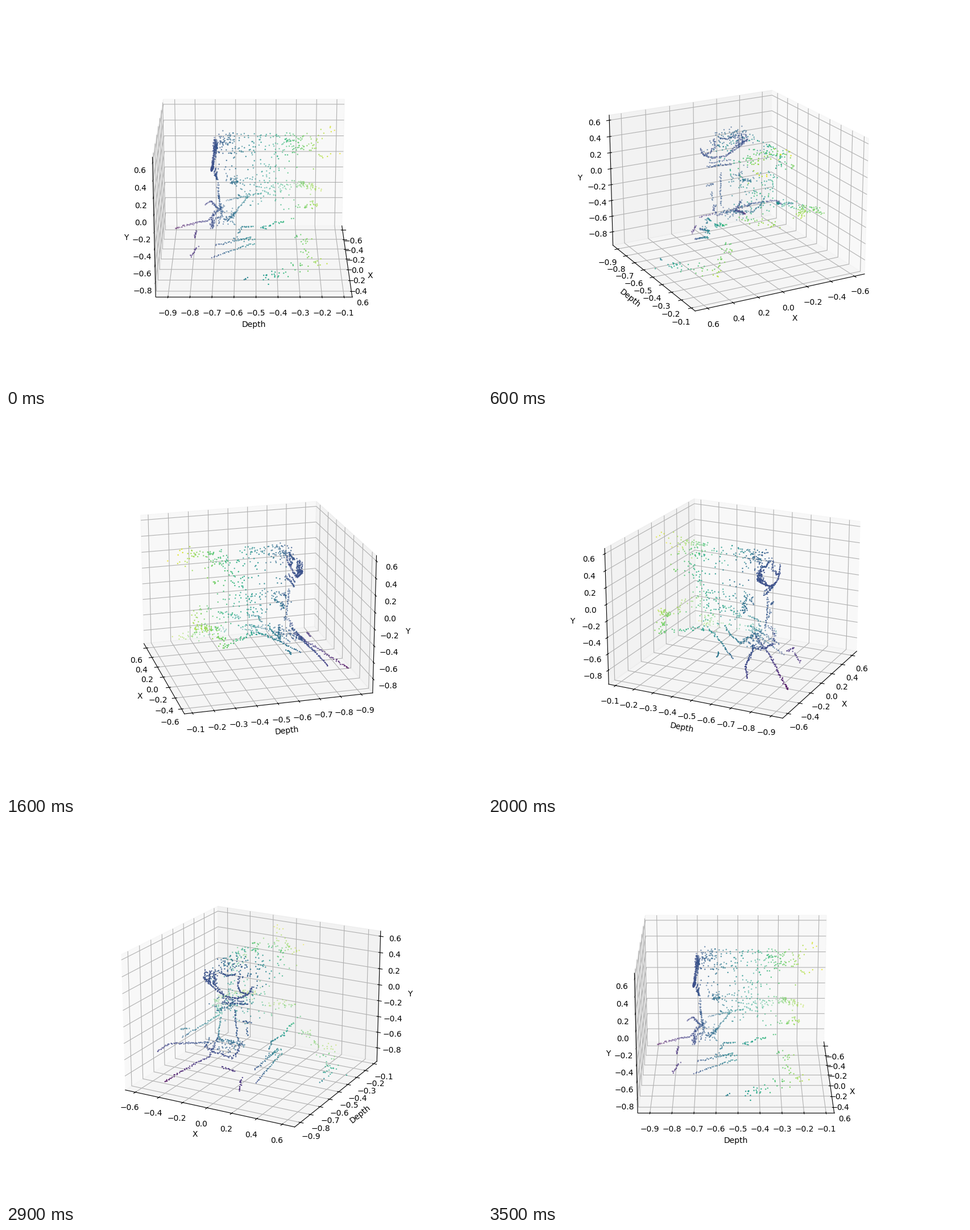
A matplotlib script that plays this animation: 837x669 px, repeating every 3.6 s.

```python
import numpy as np
import matplotlib.pyplot as plt
from matplotlib.animation import FuncAnimation

FRAMES = 36
LIMITS = np.array([(-0.687, 0.697), (-0.956, -0.063), (-0.973, 0.663)])
BOX = np.array([1190.5, 1190.5, 892.9])  # box size in model units

rng = np.random.default_rng(7)


def stroke(n, *pts, jitter=3):
    """Points spaced evenly along a polyline, like a traced edge."""
    pts = np.array(pts, float)
    steps = np.linalg.norm(np.diff(pts, axis=0), axis=1)
    s = np.r_[0, np.cumsum(steps)]
    t = np.linspace(0, s[-1], n)
    line = np.column_stack([np.interp(t, s, pts[:, k]) for k in range(3)])
    return line + rng.normal(0, jitter, (n, 3))


def haze(n, start, end, spread):
    """Loose points scattered around a segment."""
    t = rng.random((n, 1))
    line = np.array(start) * (1 - t) + np.array(end) * t
    return line + rng.normal(0, 1, (n, 3)) * spread


def cloud(n, low, high):
    return rng.uniform(low, high, (n, 3))


def hood(n):
    """Arch above the head that runs back in depth."""
    a = rng.uniform(0, np.pi, n)
    depth = -210 + 600 * rng.random(n) ** 1.25
    pts = np.column_stack([-60 + 175 * np.cos(a), depth,
                           195 + 175 * np.sin(a)])
    return pts + rng.normal(0, 9, (n, 3))


def head():
    return [
        stroke(75, (-220, -250, 260), (-150, -258, 208), (-60, -265, 164),
               (30, -265, 164), (94, -258, 196), (126, -250, 249)),
        stroke(26, (-205, -250, 250), (-140, -252, 225), (-80, -255, 172)),
        stroke(14, (-180, -245, 235), (-178, -245, 300)),
        stroke(14, (-150, -240, 215), (-146, -240, 310)),
        stroke(10, (-212, -250, 245), (-206, -248, 300)),
        stroke(18, (28, -255, 235), (52, -258, 205), (95, -255, 200)),
        stroke(12, (20, -245, 240), (30, -240, 300)),
        stroke(24, (-110, -230, 300), (-55, -235, 290), (0, -230, 305)),
        cloud(36, (-200, -260, 230), (-120, -235, 310)),
        cloud(46, (-170, -230, 280), (60, -110, 365)),
        stroke(30, (-92, -235, 112), (-10, -240, 118), (78, -230, 124)),
        stroke(14, (-90, -245, 140), (60, -245, 142)),
    ]


def torso():
    return [
        stroke(30, (-14, -228, 65), (-6, -220, -40), (0, -205, -142)),
        stroke(10, (40, -220, 5), (92, -218, 5)),
        stroke(8, (62, -210, -40), (66, -200, -95)),
        stroke(28, (-195, -145, 12), (-150, -135, 22), (-90, -100, 45),
               jitter=8),
        haze(24, (-160, -170, 70), (-40, -90, 60), (30, 25, 20)),
        cloud(66, (-230, -90, -110), (30, 260, 120)),
        haze(34, (-236, 190, 310), (-205, 40, 10), (9, 30, 12)),
        stroke(70, (-211, -190, -170), (-213, -255, -199),
               (-117, -270, -219), (-9, -270, -232), (28, -255, -190),
               (34, -220, -140), jitter=5),
        stroke(34, (-190, -120, -190), (-90, -140, -184), (5, -170, -178),
               jitter=5),
        cloud(44, (-190, -235, -235), (10, -120, -165)),
    ]


def limbs():
    return [
        stroke(46, (-352, -520, -371), (-255, -405, -300),
               (-155, -300, -240)),
        stroke(26, (-155, -295, -240), (-148, -235, -175),
               (-146, -200, -137)),
        stroke(54, (-521, -328, -265), (-456, -285, -215),
               (-320, -255, -196), (-217, -230, -180)),
        stroke(36, (-420, -180, -200), (-345, -70, -146), (-276, 50, -95)),
        stroke(10, (-480, -105, -180), (-430, -90, -172)),
        stroke(24, (-226, -30, -82), (-212, -80, -150), (-185, -120, -190)),
        stroke(12, (-33, -370, -262), (70, -376, -270)),
        stroke(14, (105, -358, -317), (114, -402, -382)),
        stroke(30, (157, -262, -366), (178, -140, -312), (200, 0, -258)),
        stroke(26, (138, -240, -294), (160, -130, -258), (182, -20, -222)),
        stroke(18, (160, -100, -200), (165, -72, -160), (175, -10, -155)),
        haze(14, (160, -120, -240), (190, -10, -235), (6, 25, 6)),
    ]


def background():
    return [
        hood(135),
        stroke(14, (-109, 500, 398), (-42, 420, 380), (60, 350, 350),
               jitter=14),
        haze(12, (60, 350, 345), (46, 230, 300), (8, 20, 12)),
        haze(16, (-118, 270, 330), (-100, 190, 315), (10, 25, 12)),
        haze(7, (40, 350, 290), (80, 500, 270), (20, 30, 12)),
        haze(34, (-276, 50, -95), (-450, 310, -95), (12, 30, 10)),
        haze(26, (-440, 300, -100), (-300, 320, -30), (20, 25, 9)),
        haze(30, (-290, 330, -35), (-215, 430, -66), (15, 25, 9)),
        haze(26, (150, 320, -50), (-100, 400, -90), (15, 30, 14)),
        haze(26, (170, 50, -165), (200, 250, -90), (7, 10, 6)),
        haze(26, (180, 290, -190), (330, 350, -320), (12, 28, 12)),
        haze(38, (520, 40, -360), (335, 400, -320), (25, 45, 12)),
        stroke(4, (500, -60, -372), (515, -40, -355)),
    ]


model = np.vstack(head() + torso() + limbs() + background())
x, depth, y = (LIMITS.mean(axis=1) + model / BOX * np.ptp(LIMITS, axis=1)).T

# The tiny surplus keeps the pixel size from being rounded down.
fig = plt.figure(figsize=(8.3701, 6.6901), dpi=100)
ax = fig.add_subplot(projection="3d")
ax.scatter(x, depth, y, c=depth, cmap="viridis", vmin=-0.9, vmax=-0.09,
           s=3, linewidths=0)
ax.set(xlim=LIMITS[0], ylim=LIMITS[1], zlim=LIMITS[2],
       xlabel="X", ylabel="Depth", zlabel="Y")


def update(i):
    ax.view_init(elev=20, azim=360 * i / (FRAMES - 1))
    return ()


anim = FuncAnimation(fig, update, frames=FRAMES, interval=100,
                     init_func=lambda: update(0), repeat=True, blit=False)
plt.show()
```
